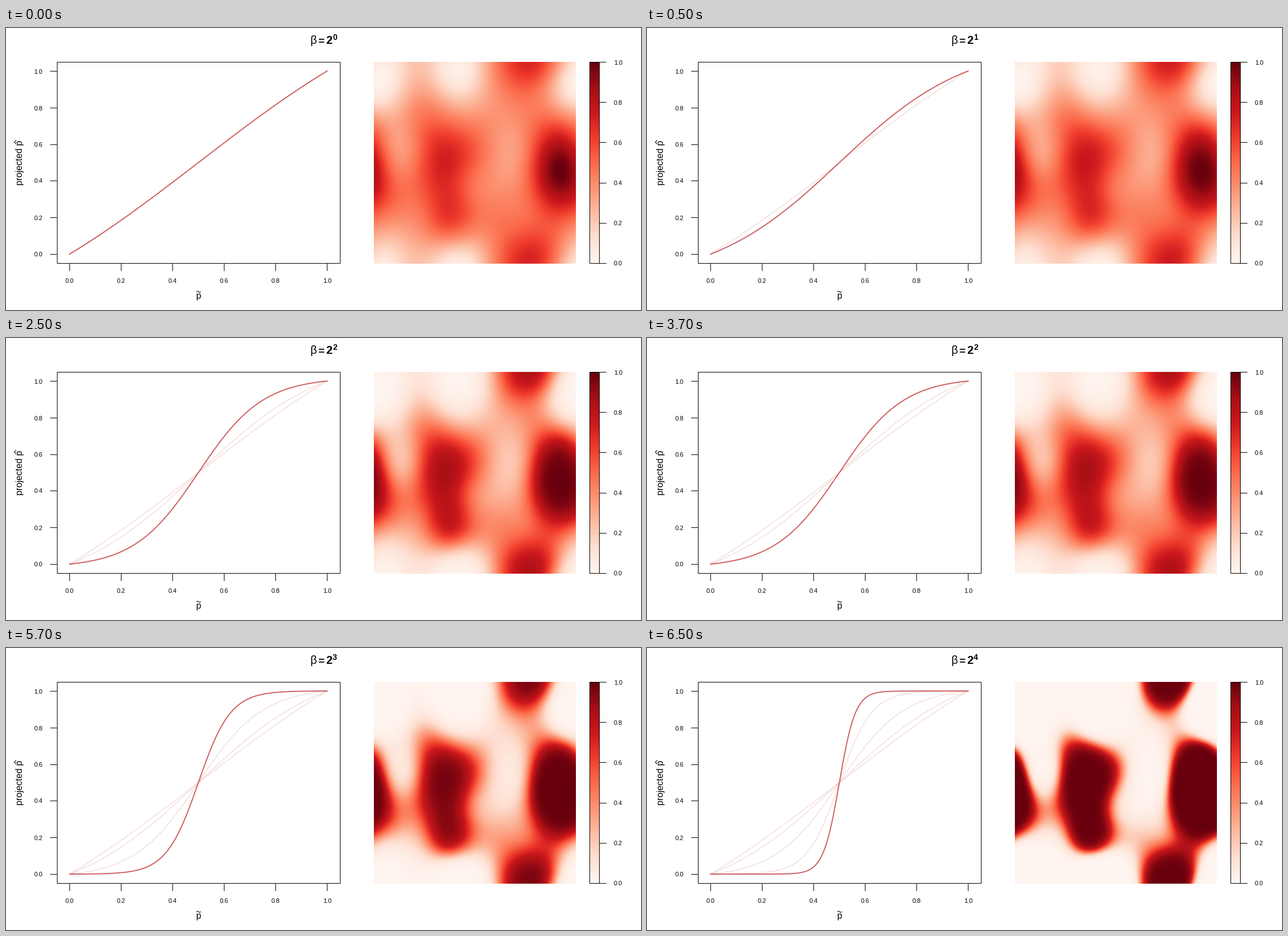
These frames come from a looping animation (1122x499 px, 8000 ms). A matplotlib script:

```python
import numpy as np
import matplotlib.pyplot as plt
from matplotlib.animation import FuncAnimation
from matplotlib.patches import Rectangle

W, H, DPI = 1122, 499, 72
LEFT, TOP, SIDE = 650, 60, 357
STEP_MS, FRAMES = 500, 16
RED = "#cd5c5c"

plt.rcParams["font.family"] = "Liberation Sans"

# Peaks, saddles and valleys of the density, and where it crosses one half
KEYS = [
    (779, 228, .71), (781, 322, .66), (981, 250, 1), (920, 60, .69),
    (935, 345, .53), (925, 136, .455), (704, 290, .485), (868, 305, .425),
    (663, 95, .02), (800, 88, .06), (733, 90, .27), (985, 100, .15),
    (672, 410, .1), (790, 410, .1), (885, 215, .34), (703, 225, .37),
    (850, 385, .37), (705, 355, .35), (1000, 385, .28), (848, 150, .37),
]
HALF = [
    (727, 240), (737, 172), (770, 164), (837, 222), (821, 288), (783, 361),
    (738, 322), (921, 250), (940, 166), (1006, 178), (1006, 336), (874, 60),
    (963, 60), (908, 114), (686, 262),
]


def kernel(a, b, length):
    """Smooth periodic correlation between two sets of coordinates."""
    k = 2 * np.pi / SIDE
    return np.exp((np.cos(k * (a[:, None] - b)) - 1) / (k * length) ** 2)


def density(mean=.4, lx=46, ly=54):
    """Periodic smooth field through the key points."""
    px, py, v = np.array(KEYS + [(x, y, .5) for x, y in HALF]).T
    cov = kernel(px, px, lx) * kernel(py, py, ly)
    weights = np.linalg.solve(cov + 5e-4 * np.eye(len(v)), v - mean)
    grid = np.arange(SIDE) + .5
    kx = kernel(LEFT + grid, px, lx)
    ky = kernel(TOP + grid, py, ly)
    return np.clip(mean + (ky * weights) @ kx.T, 0, 1)


def project(p, beta):
    t = np.tanh(beta / 2)
    return (t + np.tanh(beta * (p - .5))) / (2 * t)


def to_x(p):
    return 112.4 + 455 * p


def to_y(p):
    return 400.1 - 324 * p


fig = plt.figure(figsize=(W / DPI, H / DPI), dpi=DPI, facecolor="white")
ax = fig.add_axes([0, 0, 1, 1])
ax.axis("off")


def line(xs, ys, color="black", lw=1, **kw):
    return ax.plot(xs, ys, color=color, lw=lw, **kw)[0]


def text(x, y, s, size, va="baseline", **kw):
    return ax.text(x, y, s, size=size, ha="center", va=va, **kw)


def box(x, y, w, h):
    ax.add_patch(Rectangle((x, y), w, h, fill=False, ec="black", lw=1, zorder=4))


def heatmap(data, x0, x1, y0, y1):
    return ax.imshow(data, cmap="Reds", vmin=0, vmax=1, aspect="auto",
                     extent=(x0, x1, y1, y0))


# Heat map and colour bar
field = density()
heat = heatmap(field, LEFT, LEFT + SIDE, TOP, TOP + SIDE)
heatmap(np.linspace(1, 0, 256)[:, None], 1031, 1048, 60, 416)
box(1031, 60, 17, 356)

# Curve panel
box(90, 60, 500, 356)
for v in np.linspace(0, 1, 6):
    label = f"{v:.1f}"
    x, y, bar = to_x(v), round(to_y(v) - .1), 416 - 356 * v
    line([x, x], [417, 429])
    line([78, 90], [y, y])
    line([1048, 1060], [bar, bar])
    text(x, 451, label, 11)
    text(57, y + 4.5, label, 11)
    text(1081.5, bar + 4.5, label, 11)

p = np.linspace(0, 1, 201)
curves = [line(to_x(p), to_y(project(p, 2 ** k)), RED, 1.9, zorder=3)
          for k in range(5)]

# Axis names with their accents
text(24.5, 238, "projected p", 16, va="center", rotation=90)
line([17.5, 14.8, 17.5], [199, 202, 205], lw=1.1)
text(340.3, 479, "p", 16)
u = np.linspace(-1, 1, 25)
line(340.3 + 3.4 * u, 466.8 + np.sin(np.pi * u), lw=1.1)

# Title
text(543, 28, "β", 20)
text(556.7, 28, "=", 19, weight="bold")
text(570.5, 28, "2", 20, weight="bold")
power = text(581, 21, "0", 14, weight="bold")

ax.set_xlim(0, W)
ax.set_ylim(H, 0)


def update(i):
    level = 0 if i == 0 else 1 + (i - 1) // 4
    heat.set_data(project(field, 2 ** level))
    power.set_text(str(level))
    for k, curve in enumerate(curves):
        curve.set_visible(k <= level)
        curve.set_alpha(1 if k == level else .17)
    return [heat, power, *curves]


anim = FuncAnimation(fig, update, frames=FRAMES, interval=STEP_MS,
                     repeat=True, repeat_delay=0, blit=False)
plt.show()
```
